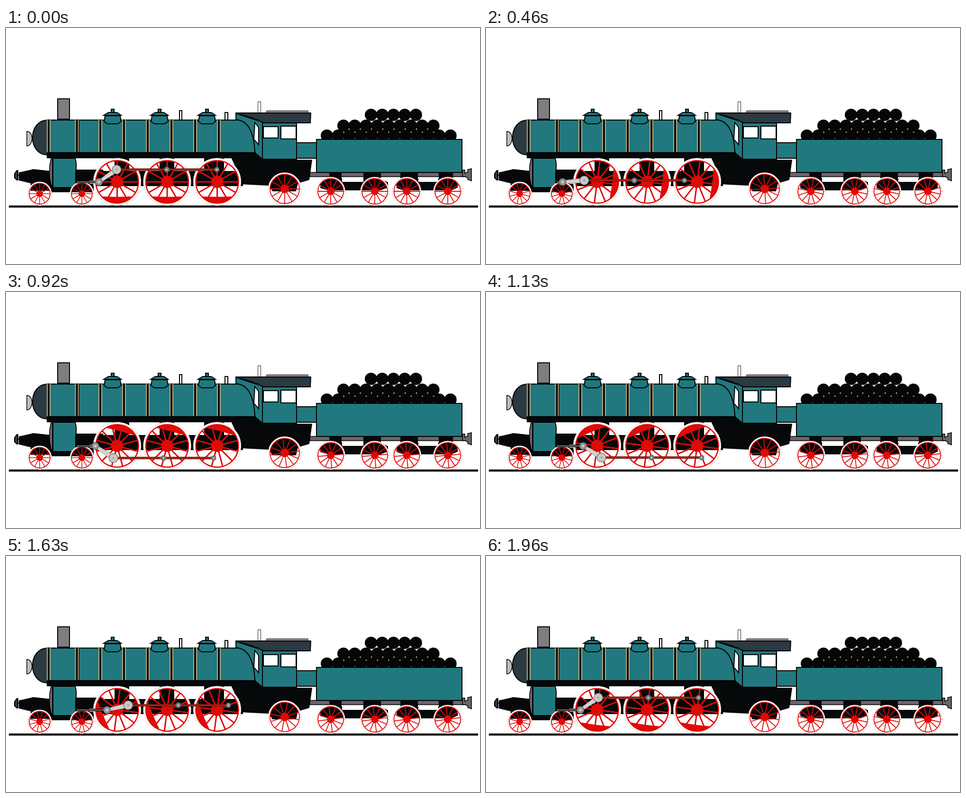
Recreate the animation shown at these times as an HTML page. Size 1000 by 500 pixels, loop 2000 ms.

```html
<!DOCTYPE html>
<html lang="en">
<head>
<meta charset="utf-8">
<title>Steam locomotive</title>
<style>
html, body { margin: 0; width: 100%; height: 100%; overflow: hidden; background: #fff; }
svg { display: block; width: 100%; height: 100%; }
.k { fill: #06080a; }
.t { fill: #21787f; stroke: #000; stroke-width: 2; }
.d { fill: #2b3a42; stroke: #000; stroke-width: 2; }
.w { fill: #fff; stroke: #000; stroke-width: 2; }
.g { fill: #6b656b; stroke: #000; stroke-width: 1.5; }
</style>
</head>
<body>
<svg id="stage" viewBox="0 0 1000 500"></svg>
<script>
const stage = document.getElementById('stage');
const RED = '#e00a08';
const CRANK = { x: 233.4, y: 326.3, r: 26.4, rod: 45.8 };
const PIN_GAP = 105.7;

function add(tag, attrs, parent = stage) {
  const el = document.createElementNS('http://www.w3.org/2000/svg', tag);
  set(el, attrs);
  return parent.appendChild(el);
}
function set(el, attrs) {
  for (const key in attrs) el.setAttribute(key, attrs[key]);
}
const shape = (cls, d) => add('path', { class: cls, d });
const box = (cls, x1, y1, x2, y2) =>
  add('rect', { class: cls, x: x1, y: y1, width: x2 - x1, height: y2 - y1 });
const disc = (cx, cy, r, fill, parent, extra) => add('circle', { cx, cy, r, fill, ...extra }, parent);

function drawUnderframe() {
  // front bogie, with the part seen through its wheels
  shape('k', 'M27 306L58 299L95 303V300H205V323H176V330H185V348H93V345H52V329L27 323Z');
  // main frame and hangers behind the driving wheels
  shape('k', 'M190 303H500V335H190Z');
  [[229, 260], [324, 355], [418, 460]].forEach(([a, b]) => box('k', a, 270, b, 304));
  // firebox and the part seen through the trailing wheel
  shape('k', 'M470 264H540V279H646L640 322L616 329L612 346H562L555 334L495 331L488 303Z');
  // tender bogies
  shape('k', 'M663 327L682 319H791L806 327V338L790 344H680L663 339Z');
  shape('k', 'M824 327L832 319H943L953 327V338L940 344H838L824 339Z');
  add('path', { d: 'M709 315H754V326H709ZM870 315H912V326H870Z', fill: '#fff' });
}

function drawEngine() {
  shape('d', 'M88 195C68 195 56 212 56 232S68 269 88 269Z');
  add('path', { d: 'M44 219C51 219 55 227 55 234S51 250 44 250Z', fill: '#c4bcc4', stroke: '#000', 'stroke-width': 1.5 });
  add('rect', { x: 109, y: 150, width: 25, height: 43, fill: '#807c7f', stroke: '#000', 'stroke-width': 2 });
  box('w', 366, 175, 371, 195);
  box('w', 462, 179, 468, 195);
  box('k', 86, 264, 526, 276);
  shape('t', 'M88 195H490C512 198 524 225 525 264H88Z');
  box('k', 152, 195, 155, 264);
  for (const x of [90, 149.5, 199, 249, 299, 349, 399, 449]) {
    add('rect', { x: x - 4, y: 193, width: 8, height: 70, fill: '#b9aa7d' });
    box('k', x - 2, 194, x + 2, 263);
  }
  for (const x of [225, 324, 424]) {
    box('t', x - 3, 172, x + 3, 180);
    shape('t', `M${x - 16} 186L${x - 18} 198L${x - 11} 203H${x + 11}L${x + 18} 198L${x + 16} 186Z`);
    shape('t', `M${x - 19} 185L${x - 9} 179H${x + 9}L${x + 18} 185Z`);
  }
  // cylinder
  shape('g', 'M98 277H95Q88 305 95 332L98 338Z');
  shape('t', 'M99 276H146Q150 290 147 306V338H99Z');
}

function drawCab() {
  shape('t', 'M485 181L543 200H613V278H541L525 264C524 225 512 198 490 195L485 193Z');
  shape('t', 'M541 200V278');
  shape('w', 'M525 200L533 211V247L523 236Z');
  box('w', 543, 209, 574, 233);
  box('w', 580, 208, 612, 235);
  add('rect', { x: 550, y: 175.5, width: 87, height: 5, fill: '#9d8d9d', stroke: '#000' });
  add('rect', { x: 531.5, y: 156.5, width: 6, height: 23, fill: '#fff', stroke: '#302028' });
  shape('d', 'M485 180H643L642 201H543C528 192 506 186 485 181Z');
}

function drawTender() {
  for (const [x, y, n] of [[677, 228, 12], [712, 207, 9], [770, 184, 5]])
    for (let i = 0; i < n; i++) disc(x + i * 23.7, y, 13, '#060607');
  box('t', 613, 243, 655, 276);
  box('g', 641, 306, 968, 315);
  [[682, 708], [754, 791], [832, 869], [913, 943]].forEach(([a, b]) => box('k', a, 306, b, 321));
  box('t', 655, 236, 962, 306);
  shape('g', 'M963 301H968V308L974 305V300L982 298V324L974 321V317L968 315H963Z');
}

// ratio: turning speed relative to the driving wheels
function wheel(cx, cy, rim, tire, hub, spoke, ratio) {
  const driving = ratio === 1;
  disc(cx, cy, (rim + tire) / 2, 'none', stage, { stroke: '#fff', 'stroke-width': tire - rim + 1 });
  disc(cx, cy, tire, 'none', stage, { stroke: '#555', 'stroke-width': 0.8, 'stroke-dasharray': '1.5 4' });
  const g = add('g', {});
  let d = '';
  for (let i = 0; i < 12; i++) {
    const a = i * Math.PI / 6;
    d += `M0 0L${rim * Math.cos(a)} ${rim * Math.sin(a)}`;
  }
  add('path', { d, stroke: RED, 'stroke-width': spoke }, g);
  disc(0, 0, rim, 'none', g, { stroke: RED, 'stroke-width': driving ? 2.5 : 1.8 });
  disc(0, 0, hub, RED, g);
  if (driving) {
    const x = rim * Math.sin(0.82), y = rim * Math.cos(0.82);
    add('path', { d: `M${-x} ${y}A${rim} ${rim} 0 0 0 ${x} ${y}Q0 ${y + 2} ${-x} ${y}Z`, fill: RED }, g);
  }
  return turn => set(g, { transform: `translate(${cx} ${cy}) rotate(${turn * ratio})` });
}

function pin(r, fill, core) {
  const g = add('g', {});
  disc(0, 0, r, fill, g, { stroke: '#666', 'stroke-width': 1.2 });
  disc(0, 0, core, '#c8c8c8', g, { stroke: '#777', 'stroke-width': 1 });
  return (x, y) => set(g, { transform: `translate(${x} ${y})` });
}

drawUnderframe();
shape('d', 'M23 302H25V322H23L18 317V309ZM25 312H29');
drawTender();
drawEngine();
drawCab();
add('rect', { x: 6, y: 376, width: 990, height: 4.5, fill: '#00100f' });

const wheels = [
  ...[71, 160].map(x => wheel(x, 351, 22, 25, 7, 1.5, 2)),
  ...[234.5, 340, 445.5].map(x => wheel(x, 326, 45, 50, 13, 3, 1)),
  wheel(588, 341, 31, 34.5, 9, 1.8, 3 / 2),
  ...[685, 778, 845.5, 932].map(x => wheel(x, 346, 27, 30, 8, 1.8, 5 / 3))
];
const pistonRod = add('path', { class: 'w', 'stroke-width': 1 });
const sideRod = add('path', { stroke: '#5a1008', 'stroke-width': 5 });
const sideRodCore = add('path', { stroke: '#b0220f', 'stroke-width': 3 });
const mainRod = add('path', { fill: '#d2d2d2', stroke: '#888', 'stroke-width': 0.8 });
const crosshead = pin(7.5, '#8d9498', 4);
const sidePins = [pin(5.5, '#777', 2.5), pin(5, '#777', 2.5)];
const crankPin = pin(9.5, '#c8c8c8', 1.2);

function draw(ms) {
  // 48 poses per turn, on a 10 ms clock
  const step = Math.ceil((Math.floor(ms / 10) + 0.5) * 6 / 25) - 1;
  const turn = step * 7.5;
  const a = turn * Math.PI / 180;
  const dx = -CRANK.r * Math.sin(a), dy = -CRANK.r * Math.cos(a);
  const x = CRANK.x + dx, y = CRANK.y + dy;
  const reach = Math.sqrt(CRANK.rod ** 2 - dy * dy);
  const hx = x - reach, hy = CRANK.y;

  wheels.forEach(spin => spin(-turn));
  set(pistonRod, { d: `M148 ${hy - 1.5}H${hx}V${hy + 1.5}H148Z` });
  const line = `M${x} ${y}H${x + 2 * PIN_GAP}`;
  set(sideRod, { d: line });
  set(sideRodCore, { d: line });
  set(mainRod, {
    d: `M0 -3L${CRANK.rod} -5V5L0 3Z`,
    transform: `translate(${hx} ${hy}) rotate(${Math.atan2(dy, reach) * 180 / Math.PI})`
  });
  crosshead(hx, hy);
  sidePins.forEach((place, i) => place(x + (i + 1) * PIN_GAP, y));
  crankPin(x, y);
}

const start = performance.now();
function tick() {
  draw((performance.now() - start) % 2000);
  requestAnimationFrame(tick);
}
tick();
</script>
</body>
</html>
```
